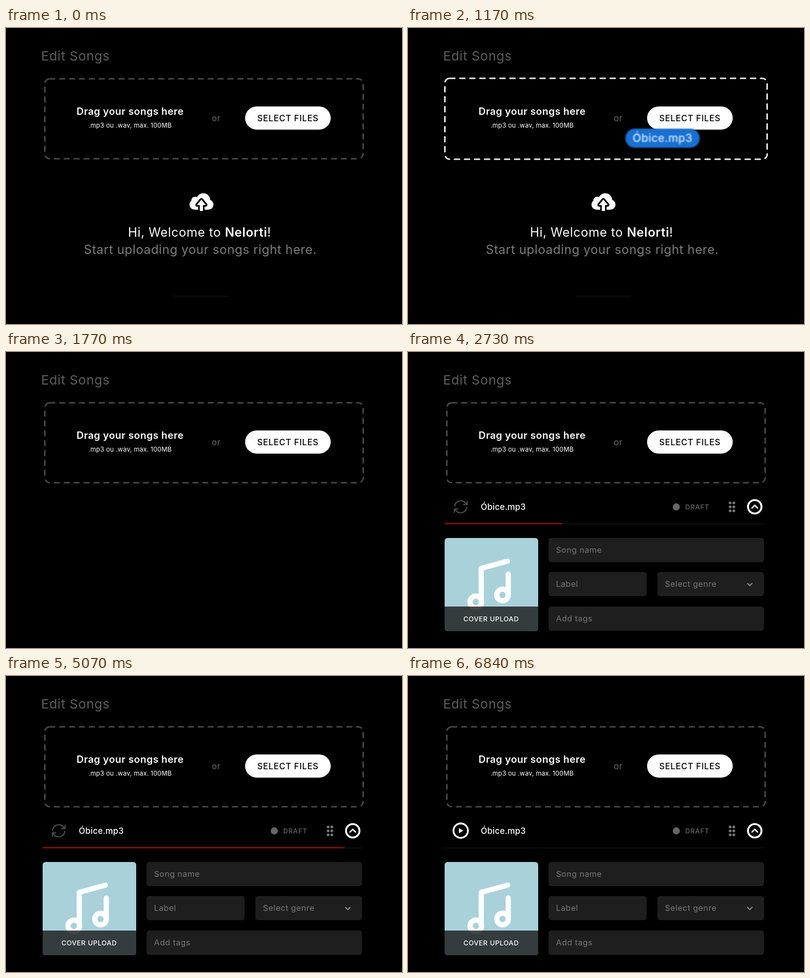
Animation of 800x600 px, one loop 8460 ms. Source, as an HTML page with a canvas:

```html
<!DOCTYPE html>
<html lang="en">
<head>
<meta charset="utf-8">
<title>Song upload</title>
<style>
html, body { margin: 0; width: 100%; height: 100%; overflow: hidden; background: #000; }
canvas { display: block; }
</style>
</head>
<body>
<canvas id="stage" width="800" height="600"></canvas>
<script>
const LOOP = 8460;
const FONT = 'Inter, "Open Sans", sans-serif';
const stage = document.getElementById('stage').getContext('2d');
let ctx = stage;

const mix = (a, b, p) => a + (b - a) * p;
const ramp = (t, start, length) => Math.min(1, Math.max(0, (t - start) / length));
const ease = p => (1 - Math.cos(Math.PI * p)) / 2;
const tween = (t, start, length) => ease(ramp(t, start, length));

function group(alpha, draw) {
  if (alpha <= 0) return;
  ctx.save();
  ctx.globalAlpha *= alpha;
  draw();
  ctx.restore();
}

// Returns the x position after the text; spacing is in em.
function text(str, x, y, size, color, weight = 400, spacing = 0.027, align = 'left') {
  ctx.font = `${weight} ${size}px ${FONT}`;
  ctx.letterSpacing = spacing * size + 'px';
  ctx.textAlign = align;
  ctx.fillStyle = color;
  ctx.fillText(str, x, y);
  return x + ctx.measureText(str).width;
}

function box(x, y, w, h, r, color) {
  ctx.beginPath();
  ctx.roundRect(x, y, w, h, r);
  ctx.fillStyle = color;
  ctx.fill();
}

function disc(x, y, r, color) {
  ctx.beginPath();
  ctx.arc(x, y, r, 0, 2 * Math.PI);
  ctx.fillStyle = color;
  ctx.fill();
}

function ring(x, y, r, width, color) {
  ctx.beginPath();
  ctx.arc(x, y, r, 0, 2 * Math.PI);
  ctx.lineWidth = width;
  ctx.strokeStyle = color;
  ctx.stroke();
}

function trace(points) {
  ctx.beginPath();
  points.forEach(([x, y]) => ctx.lineTo(x, y));
}

function line(points, width, color) {
  trace(points);
  ctx.lineWidth = width;
  ctx.strokeStyle = color;
  ctx.lineCap = ctx.lineJoin = 'round';
  ctx.stroke();
}

function dropZone(active) {
  const scale = mix(1, 1.0125, active);
  const shade = Math.round(mix(72, 236, active));
  ctx.save();
  ctx.translate(400, 184);
  ctx.scale(scale, scale);
  ctx.beginPath();
  ctx.roundRect(-321.5, -81, 643, 162, 10);
  ctx.setLineDash([10, 10]);
  ctx.lineCap = 'round';
  ctx.lineWidth = 3;
  ctx.strokeStyle = `rgb(${shade},${shade},${shade})`;
  ctx.stroke();
  ctx.restore();

  text('Drag your songs here', 250.8, 176, 20, '#fff', 600, 0.023, 'center');
  text('.mp3 ou .wav, max. 100MB', 250.7, 202, 13, '#fff', 400, 0.011, 'center');
  text('or', 424.5, 189, 17, '#6c6c6c', 400, 0.02, 'center');
  box(483, 159, 173, 47, 23.5, '#fff');
  text('SELECT FILES', 569.5, 189, 17, '#000', 500, 0.045, 'center');
}

function cloud() {
  box(376, 350, 38, 18.5, 8, '#fff');
  disc(380.8, 358, 10.2, '#fff');
  disc(409, 358, 10.2, '#fff');
  disc(382, 349.5, 7.5, '#fff');
  disc(398.5, 349, 14, '#fff');
  const arrow = [[394.7, 348.5], [403, 358.5], [397.4, 358.5], [397.4, 370.5],
    [392, 370.5], [392, 358.5], [386.4, 358.5], [394.7, 348.5]];
  line(arrow, 7.5, '#000');
  line(arrow, 1, '#fff');
  ctx.fillStyle = '#fff';
  ctx.fill();
}

function welcome() {
  cloud();
  let x = text('Hi, Welcome to ', 246.5, 423, 25, '#fff', 400, 0.027);
  x = text('Nelorti', x, 423, 25, '#fff', 600, 0.025);
  text('!', x, 423, 25, '#fff');
  text('Start uploading your songs right here.', 392.5, 458, 25, '#7c7c7c', 400, 0.025, 'center');
  ctx.fillStyle = '#1c1c1c';
  ctx.fillRect(338, 543, 112, 1);
}

function refreshIcon() {
  const color = '#4c4c4c', turn = Math.PI;
  ctx.save();
  ctx.translate(106.5, 313.7);
  for (let i = 0; i < 2; i++) {
    ctx.beginPath();
    ctx.arc(0, 0, 12.3, turn * 1.04, turn * 1.84);
    ctx.lineWidth = 2.4;
    ctx.strokeStyle = color;
    ctx.lineCap = 'round';
    ctx.stroke();
    line([[12.8, -11], [12.8, -4.4], [6, -4.4]], 2.4, color);
    ctx.rotate(turn);
  }
  ctx.restore();
}

function playIcon(scale) {
  ctx.save();
  ctx.translate(106.5, 313.5);
  ctx.scale(scale, scale);
  ring(0, 0, 14.6, 3.6, '#fff');
  trace([[-3.7, -5.2], [5.3, 0], [-3.7, 5.2]]);
  ctx.fillStyle = '#fff';
  ctx.fill();
  ctx.restore();
}

function cover() {
  ctx.save();
  ctx.beginPath();
  ctx.roundRect(74, 377, 189, 189, 6);
  ctx.clip();
  ctx.fillStyle = '#a9d1da';
  ctx.fillRect(74, 377, 189, 189);
  line([[148, 505], [148, 438.5], [201, 424]], 10.5, '#fff');
  line([[202.5, 450], [202.5, 491]], 10.5, '#fff');
  ring(137, 506.5, 11.7, 10.6, '#fff');
  ring(191, 492.5, 11.7, 10.6, '#fff');
  ctx.fillStyle = 'rgba(23,23,23,.8)';
  ctx.fillRect(74, 516, 189, 50);
  ctx.restore();
  text('COVER UPLOAD', 168, 546, 13.5, '#fff', 500, 0.045, 'center');
}

function field(label, x, y, w) {
  box(x, y, w, 49, 5, '#1e1e1e');
  text(label, x + 15, y + 30, 16.5, '#777', 400, 0.03);
}

// Each stage: start, duration, right end of the bar.
const STAGES = [[2205, 870, 433], [3075, 870, 556], [3945, 870, 649], [4815, 510, 719]];

function barEnd(t) {
  return STAGES.reduce((x, [start, length, end]) => mix(x, end, tween(t, start, length)), 74);
}

function songPanel(t) {
  const done = tween(t, 5325, 360);
  const pulse = tween(t, 5685, 855) - tween(t, 6540, 300);
  group(1 - done, refreshIcon);
  group(done, () => playIcon(1 + 0.06 * pulse));
  text('Óbice.mp3', 147, 320, 17, '#fff', 500, 0.012);
  disc(542, 314, 7.2, '#666');
  text('DRAFT', 560, 319, 13.5, '#666', 500, 0.06);
  for (let i = 0; i < 6; i++) disc(650.8 + i % 2 * 7.4, 306 + (i >> 1) * 8, 2.8, '#777');
  ring(700.5, 313.7, 13.6, 3.8, '#fff');
  line([[695, 316.3], [700.5, 310.8], [706, 316.3]], 2.8, '#fff');

  ctx.fillStyle = '#1d1d1d';
  ctx.fillRect(74, 348, 645, 1);
  group(1 - done, () => {
    ctx.fillStyle = '#e6180c';
    ctx.fillRect(74, 347.5, barEnd(t) - 74, 1.5);
  });

  cover();
  field('Song name', 284, 377, 435);
  field('Label', 284, 446, 198);
  field('Select genre', 504, 446, 215);
  field('Add tags', 284, 516, 435);
  line([[686, 469], [690.5, 473.5], [695, 469]], 2.4, '#888');
}

function layer(w, h, draw) {
  const canvas = document.createElement('canvas');
  canvas.width = w;
  canvas.height = h;
  const previous = ctx;
  ctx = canvas.getContext('2d');
  draw();
  ctx = previous;
  return canvas;
}

function makePill() {
  return layer(170, 60, () => {
    ctx.filter = 'blur(1.2px)';
    box(10, 11, 150, 38.5, 19, '#126bd0');
    ctx.filter = 'blur(0.9px)';
    text('Óbice.mp3', 85, 37.5, 22.5, '#dfebf9', 500, 0.015, 'center');
  });
}

// Averages a few exposures along the path for motion blur.
const smear = layer(800, 600, () => {}).getContext('2d');
function pill(t) {
  const shots = 8, shutter = 9;
  smear.clearRect(0, 0, 800, 600);
  smear.globalCompositeOperation = 'lighter';
  smear.globalAlpha = 1 / shots;
  for (let i = 0; i < shots; i++) {
    const p = tween(t + (i / (shots - 1) - 0.5) * shutter, 360, 870);
    smear.drawImage(sprite, mix(907.7, 509.7, p) - 85, mix(179, 223.6, p) - 30);
  }
  ctx.drawImage(smear.canvas, 0, 0);
}

const sprite = makePill();

function render(t) {
  ctx.fillStyle = '#000';
  ctx.fillRect(0, 0, 800, 600);
  text('Edit Songs', 71, 66, 26, '#5e5e5e', 400, 0.03);
  dropZone(tween(t, 360, 300) - tween(t, 1240, 400));
  group(1 - tween(t, 1240, 530), welcome);
  if (t > 360) group(1 - tween(t, 1240, 300), () => pill(t));

  const shown = ramp(t, 1800, 120);
  group(shown, () => {
    ctx.translate(0, 21 * (1 - shown));
    songPanel(t);
  });
}

const began = performance.now();
function tick() {
  render((performance.now() - began) % LOOP);
  requestAnimationFrame(tick);
}
tick();
</script>
</body>
</html>
```
